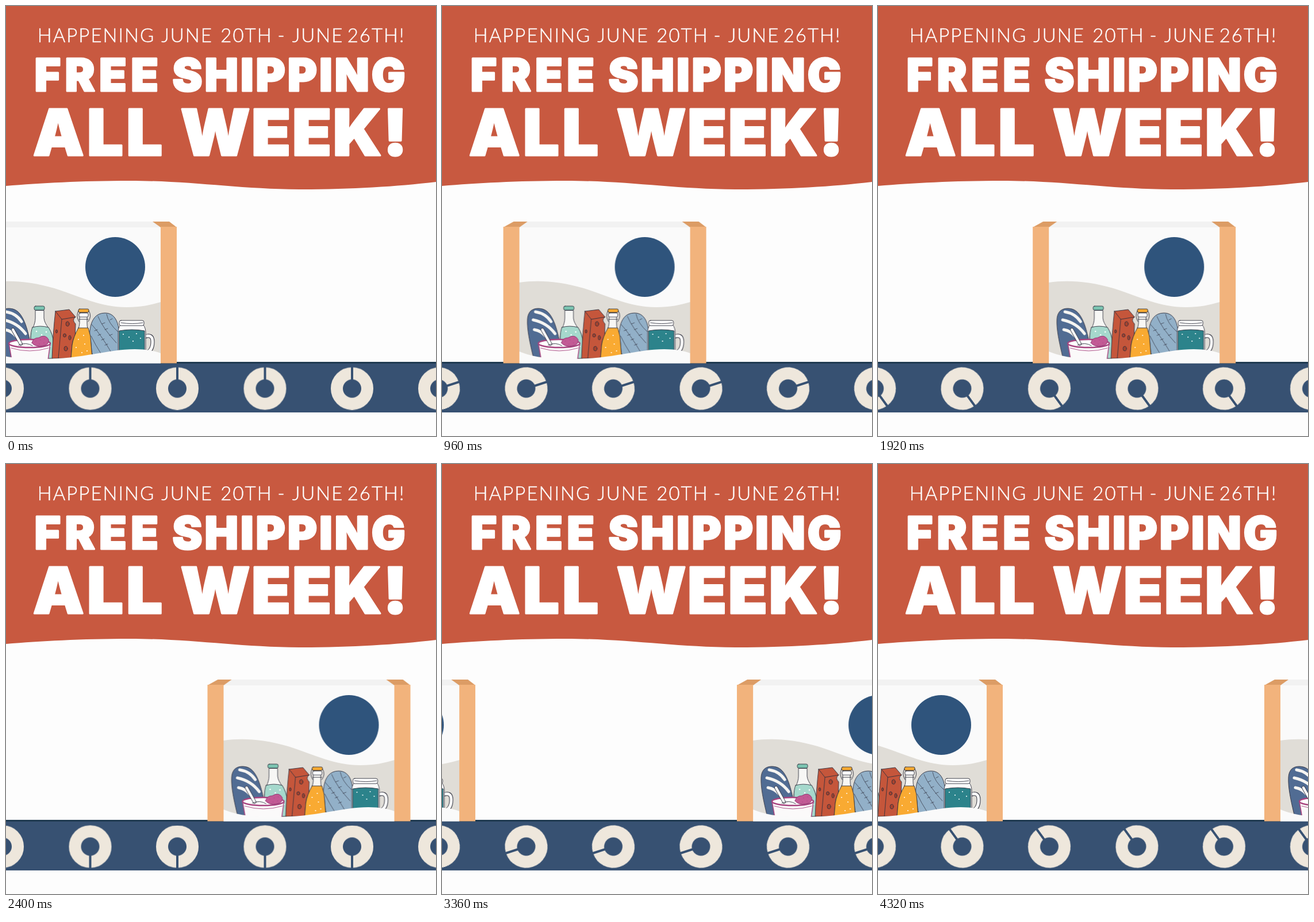
Write an HTML page that moves like this. It is 748 px wide and 748 px high and loops after 4.8 s.

```html
<!DOCTYPE html>
<html lang="en">
<head>
<meta charset="utf-8">
<title>Free shipping all week</title>
<style>
  html, body { margin: 0; width: 100%; height: 100%; overflow: hidden; background: #fdfdfd; }
  svg { display: block; width: 100vw; height: 100vh; }
  text { fill: #fff; stroke: #fff; stroke-linejoin: round; text-anchor: middle; }
  .date { font: 300 33px Lato, sans-serif; letter-spacing: 2px; stroke-width: .5; }
  .head { font-family: Inter, sans-serif; font-weight: 900; stroke-width: 3; }
  .mid { font-size: 78px; }
  .big { font-size: 112px; }
  .ink { stroke: #30323f; stroke-width: .9; stroke-linejoin: round; stroke-linecap: round; }
  .line { fill: none; }
  .spin { animation: spin 4.8s steps(10) infinite; }
  .slide { animation: slide 4.8s infinite; }
  @keyframes spin { to { transform: rotate(360deg); } }
  @keyframes slide {
    0% { transform: translateX(-56px); animation-timing-function: steps(9); }
    89.99% { transform: translateX(675.7px); animation-timing-function: step-end; }
    90%, 100% { transform: translateX(672px); animation-timing-function: step-end; }
  }
</style>
</head>
<body>
<svg viewBox="0 0 748 748">
  <defs>
    <g id="wheel">
      <circle r="26.5" fill="none" stroke="#eee7dc" stroke-width="21"/>
      <path d="M0-38V-14" stroke="#375172" stroke-width="4"/>
    </g>

    <g id="loaf" class="ink">
      <path fill="#516c93" d="M52 610C46 585 41 562 42 545C43 528 55 524 68 527C84 531 92 556 97 580L100 612Z"/>
      <path class="line" style="stroke:#f6f5f2;stroke-width:5" d="M56 532Q74 535 83 549M52 546Q76 551 90 570M54 563Q66 565 74 575"/>
    </g>

    <g id="milk" class="ink">
      <path fill="#f7f7f5" d="M107 530V543C107 556 99 562 99 580V613H138V582C136 562 123 556 122 543V530Z"/>
      <path fill="#a5d8cc" d="M102 559Q115 555 130 559Q138 572 138 584V613H99V580Q99 566 102 559Z"/>
      <rect fill="#7cc4b1" x="105" y="522" width="18" height="7" rx="2.5"/>
      <path class="line" style="stroke:#fff;stroke-width:2.5" d="M109 566v0M118 572v0M126 567v0M113 578v0M128 580v0M133 592v0"/>
    </g>

    <g id="cheese" class="ink">
      <path fill="#c5563b" d="M142 531L166 528L177 541Q170 546 177 553L176 582L170 613H136Q138 565 142 531Z"/>
      <path class="line" d="M142 531L153 545L177 541M153 545L147 613"/>
      <g fill="#a8432e">
        <ellipse cx="163" cy="553" rx="3" ry="4"/><ellipse cx="158" cy="573" rx="2.5" ry="3"/>
        <ellipse cx="167" cy="577" rx="2" ry="4"/><ellipse cx="160" cy="596" rx="3" ry="4"/>
        <ellipse cx="144" cy="566" rx="1.5" ry="3"/>
      </g>
    </g>

    <g id="juice" class="ink">
      <path fill="#f8f7f4" d="M184 534V552C183 566 172 574 171 590L169 613H206L204 588C203 572 197 565 197 552V534Z"/>
      <path fill="#f9aa32" d="M182 560H199Q204 574 204 588L206 613H169L171 590Q173 576 182 560Z"/>
      <rect fill="#f9aa32" x="182" y="527" width="18" height="6" rx="2"/>
      <rect fill="#fff" x="183" y="534" width="16" height="7" rx="2"/>
      <path class="line" d="M182 530Q177 540 183 549M200 530Q206 540 199 549M183 545H199"/>
      <path class="line" style="stroke:#fff;stroke-width:2" d="M182 580v0M193 588v0M197 600v0M178 594v0M188 603v0M191 573v0"/>
    </g>

    <g id="sourdough" class="ink">
      <path fill="#92b0c8" d="M207 608C198 580 197 534 228 534C249 534 257 556 253 608Z"/>
      <g class="line" stroke-width=".7">
        <path d="M205 554Q220 570 240 604M216 540Q224 560 248 586M231 536Q234 552 251 567M204 574Q211 589 222 606"/>
        <path d="M210 565l5-2M216 573l5-2M222 581l5-2M228 590l5-2M223 553l5-2M228 563l5-2M236 573l5-2M237 546l4-2"/>
      </g>
    </g>

    <g id="mug" class="ink">
      <path class="line" style="stroke-width:7" d="M298 575Q311 570 311 584Q311 602 297 604"/>
      <path class="line" style="stroke:#fafafa;stroke-width:5" d="M297 575Q311 570 311 584Q311 602 296 604"/>
      <path fill="#fafafa" d="M255 555Q251 560 251 568V608H299V568Q299 560 295 555Z"/>
      <path fill="#2c838b" d="M253 565Q275 561 297 565V608H253Z"/>
      <rect fill="#fff" x="253" y="547" width="43" height="9" rx="3"/>
      <path class="line" d="M256 551Q276 554 294 551"/>
      <path class="line" style="stroke:#fff;stroke-width:2" d="M260 571v0M270 576v0M283 570v0M290 578v0M277 583v0"/>
    </g>

    <g id="yogurt" class="ink">
      <path fill="#fbfafa" style="stroke:#a8437f;stroke-width:1.5" d="M61 587L66 616H129L133 587Z"/>
      <ellipse fill="#fff" style="stroke:#a8437f;stroke-width:2.5" cx="97" cy="587" rx="36" ry="7"/>
      <path class="line" style="stroke:#a8437f" d="M65 595Q97 605 130 595"/>
      <path class="line" style="stroke-width:6" d="M68 563L82 588"/>
      <path class="line" style="stroke:#fff;stroke-width:4.4" d="M68 563L82 588"/>
      <path class="line" d="M78 590Q91 584 102 591"/>
      <path fill="#c25a95" style="stroke:#8f3570" d="M101 586Q103 577 113 577Q124 570 130 580Q132 589 121 591Q107 594 101 586Z"/>
      <path class="line" style="stroke:#8f3570" d="M108 583v0M114 588v0M116 581v0M122 586v0M123 579v0"/>
    </g>

    <g id="box">
      <path fill="#dc9c65" d="M0 385L18 375H340L353 385Z"/>
      <path fill="#f2f2f2" d="M28 385L42 375H311L325 385Z"/>
      <path fill="#f2b37c" d="M0 384H28V621.5H0ZM325 384H353V621.5H325Z"/>
      <path fill="#fafafa" d="M28 385H325V621.5H28Z"/>
      <path fill="#e0ddd7" d="M28 481C60 476 100 479 140 491C190 507 220 524 266 524C290 524 308 520 325 515V615H28Z"/>
      <use href="#loaf"/>
      <use href="#milk"/>
      <use href="#cheese"/>
      <use href="#sourdough"/>
      <use href="#juice"/>
      <use href="#mug"/>
      <use href="#yogurt"/>
      <path fill="#fafafa" d="M28 601C44 608 70 614 110 614C190 615 230 597 280 597C300 597 315 600 325 604V621.5H28Z"/>
      <circle fill="#2f547c" cx="246" cy="454" r="52"/>
    </g>
  </defs>

  <rect width="748" height="748" fill="#fdfdfd"/>
  <path fill="#c85940" d="M0 0H748V306C680 314 600 319 515 319C405 319 325 304 215 304C130 304 60 308 0 313Z"/>

  <g class="date">
    <text x="157" y="63">HAPPENING</text>
    <text x="315" y="63">JUNE</text>
    <text x="418.5" y="63">20TH</text>
    <text x="479.5" y="63">-</text>
    <text x="542.5" y="63">JUNE</text>
    <text x="644" y="63">26TH!</text>
  </g>
  <g class="head mid">
    <text x="161" y="148.3" letter-spacing="7.5">FREE</text>
    <text x="494" y="148.3" letter-spacing="4">SHIPPING</text>
  </g>
  <g class="head big">
    <text x="162" y="260" letter-spacing="5">ALL</text>
    <text x="502" y="260" letter-spacing="2.2">WEEK!</text>
  </g>

  <rect y="620" width="748" height="87" fill="#375172"/>
  <rect y="619" width="748" height="3" fill="#1f3a50"/>
  <g transform="translate(-6 665.5)"><use class="spin" href="#wheel"/></g>
  <g transform="translate(146.5 665.5)"><use class="spin" href="#wheel"/></g>
  <g transform="translate(298 665.5)"><use class="spin" href="#wheel"/></g>
  <g transform="translate(450.5 665.5)"><use class="spin" href="#wheel"/></g>
  <g transform="translate(602 665.5)"><use class="spin" href="#wheel"/></g>
  <g transform="translate(754 665.5)"><use class="spin" href="#wheel"/></g>

  <g class="slide">
    <use href="#box"/>
    <use href="#box" x="-808"/>
  </g>
</svg>
</body>
</html>
```
